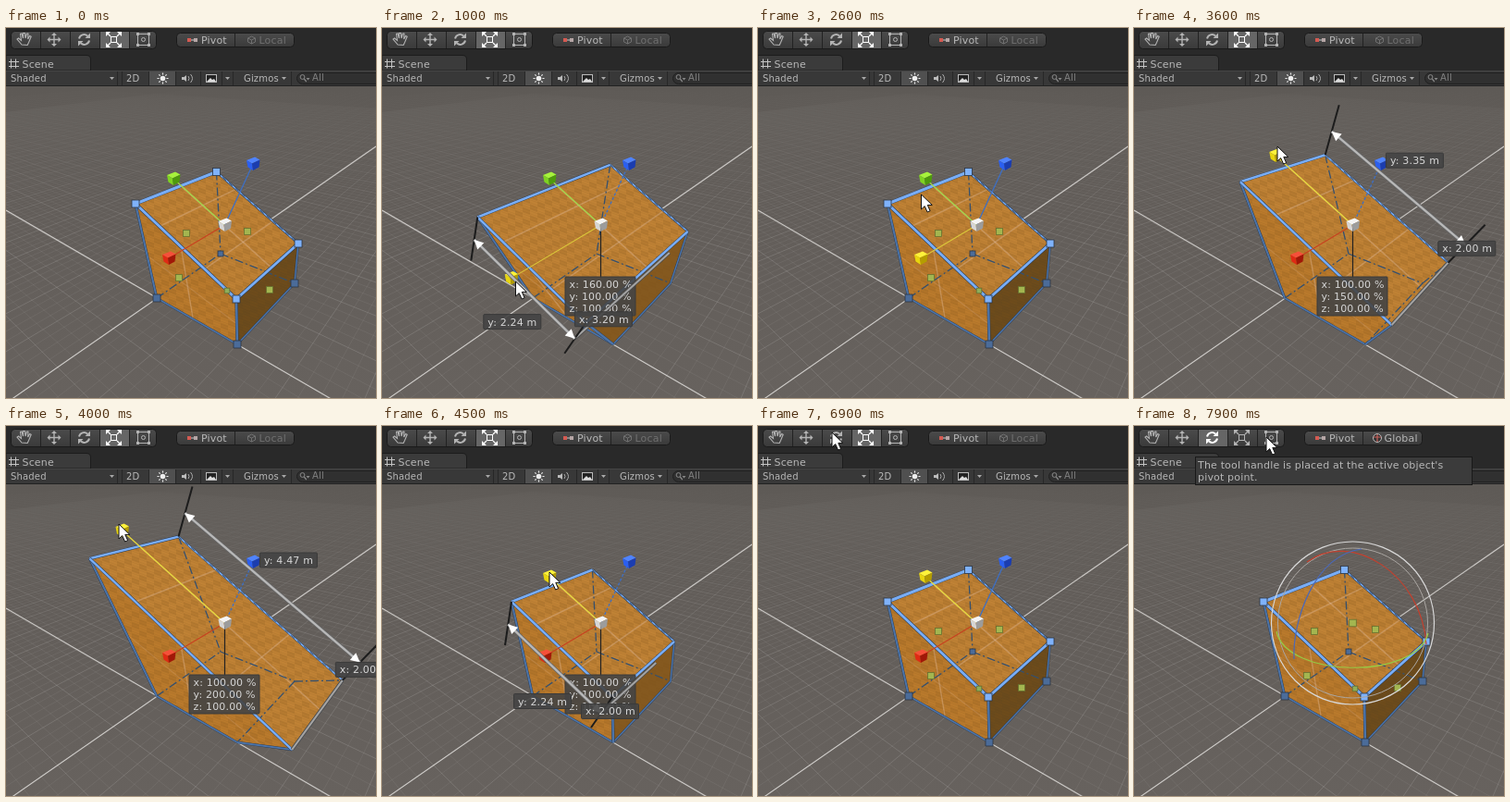
Recreate the animation shown at these times as an HTML page. Size 400 by 400 pixels, loop 8 s.

```html
<!DOCTYPE html>
<html lang="en">
<head>
<meta charset="utf-8">
<title>Scene view</title>
<style>
html, body { margin: 0; width: 100%; height: 100%; overflow: hidden; background: #292929; }
svg { display: block; width: 100vw; height: 100vh; }
text { font: 11px "DejaVu Sans", sans-serif; letter-spacing: .17px; fill: #b8b8b8; white-space: pre; }
.small text { font-size: 10px; }
</style>
</head>
<body>
<svg viewBox="0 0 400 400">
  <defs>
    <linearGradient id="sky" x1="0" y1="0" x2="0" y2="1">
      <stop offset="0" stop-color="#5e5a56"/><stop offset=".35" stop-color="#625d59"/><stop offset="1" stop-color="#67625e"/>
    </linearGradient>
    <linearGradient id="fade" gradientUnits="userSpaceOnUse" x1="0" y1="63" x2="0" y2="240">
      <stop offset="0" stop-color="#000"/><stop offset=".3" stop-color="#555"/><stop offset="1" stop-color="#fff"/>
    </linearGradient>
    <linearGradient id="btn" x1="0" y1="0" x2="0" y2="1">
      <stop offset="0" stop-color="#4b4b4b"/><stop offset="1" stop-color="#3a3a3a"/>
    </linearGradient>
    <mask id="haze"><rect y="63" width="400" height="337" fill="url(#fade)"/></mask>
    <clipPath id="view"><rect y="63" width="400" height="337"/></clipPath>
    <pattern id="weave" width="16" height="12" patternUnits="userSpaceOnUse" patternTransform="skewY(20)">
      <path d="M0 0h8v6h-8zM8 6h8v6h-8z" fill="#7a5018" opacity=".16"/>
      <path d="M0 1.500h16M0 4.500h16M0 7.500h16M0 10.500h16" stroke="#7a5018" stroke-width="1" opacity=".14"/>
    </pattern>
  </defs>
  <g clip-path="url(#view)">
    <rect y="63" width="400" height="337" fill="url(#sky)"/>
    <g id="grid" mask="url(#haze)" fill="none"></g>
    <path d="M0 197L360 406M400 128L0 405.5" stroke="#e4e2df" stroke-width="1.1" opacity=".8"/>
    <g id="model"></g>
    <g id="gizmo"></g>
  </g>
  <g id="bars"></g>
  <g id="tools"></g>
  <g id="tip">
    <rect x="66.5" y="33.5" width="299" height="30" fill="#3b3b3b" stroke="#191919"/>
    <text x="69" y="46">The tool handle is placed at the active object's</text>
    <text x="69" y="59">pivot point.</text>
  </g>
  <path id="cursor" d="M0 0V16L3.7 12.6L6.6 19L9.6 17.7L6.8 11.4H11.8Z" fill="#fff" stroke="#111" stroke-width="1"/>
</svg>
<script>
const LOOP = 8000;
const $ = id => document.getElementById(id);
const mix = (a, b, k) => a + (b - a) * k;
const lerp = (p, q, k) => [mix(p[0], q[0], k), mix(p[1], q[1], k)];
const shift = (p, d, k = 1) => [p[0] + d[0] * k, p[1] + d[1] * k];
const pt = p => p[0].toFixed(1) + ' ' + p[1].toFixed(1);
const trail = ps => 'M' + ps.map(pt).join('L');

const path = (d, stroke, w = 1, extra = '') =>
  `<path d="${d}" fill="none" stroke="${stroke}" stroke-width="${w}" ${extra}/>`;
const fill = (d, color, extra = '') => `<path d="${d}" fill="${color}" ${extra}/>`;
const line = (p, q, color, w, extra) => path(trail([p, q]), color, w, extra);
const rect = (x, y, w, h, color, extra = '') =>
  `<rect x="${x}" y="${y}" width="${w}" height="${h}" fill="${color}" ${extra}/>`;
const text = (x, y, s, extra = '') => `<text x="${x}" y="${y}" ${extra}>${s}</text>`;

// Perspective map sending the square [-1,1] x [-1,1] onto a quad
function plane(a, b, c, d) {
  const e = [c[0] - a[0], c[1] - a[1]], f = [d[0] - b[0], d[1] - b[1]], g = [b[0] - a[0], b[1] - a[1]];
  const det = e[0] * f[1] - e[1] * f[0];
  const s = (g[0] * f[1] - g[1] * f[0]) / det, t = (g[0] * e[1] - g[1] * e[0]) / det;
  const h = (p, w) => [p[0] * w, p[1] * w, w];
  const A = h(a, 2 - 2 * s), B = h(b, 2 - 2 * t), C = h(c, 2 * s);
  const mid = A.map((n, i) => (n + C[i]) / 2);
  const U = A.map((n, i) => (B[i] - n) / 2), V = B.map((n, i) => (C[i] - n) / 2);
  const at = (u, v) => {
    const [x, y, w] = mid.map((n, i) => n + u * U[i] + v * V[i]);
    return [x / w, y / w];
  };
  return { at, mid, U, V };
}

const E = [163, 292], F = [232, 244], G = [312, 276], H = [250, 342];
const top4 = plane([140, 190], [227.5, 155.5], [316, 233], [249, 293]);
const ground = plane(E, F, G, H);
const HUB = [236.5, 213];
const RED = [176, 249], GREEN = [181, 163], BLUE = [267, 147];

function drawGrid() {
  let fine = '', bold = '';
  const { at, mid, U, V } = ground;
  const add = (p, q, i) => { if (i % 4) fine += trail([p, q]); else bold += trail([p, q]); };
  for (let i = -60; i <= 110; i++) {
    const u = i / 4 - 1;
    add(at(u, (0.12 - mid[2] - u * U[2]) / V[2]), at(u, -50), i);
  }
  for (let i = -130; i <= 60; i++) {
    const v = i / 4 - 1;
    add(at((0.12 - mid[2] - v * V[2]) / U[2], v), at(60, v), i);
  }
  $('grid').innerHTML = path(fine, '#fff', .8, 'opacity=".08"') + path(bold, '#fff', 1, 'opacity=".13"');
}

function drawBars() {
  const caret = (x, y) => fill(`M${x} ${y}h5l-2.5 3z`, '#aaa');
  const cut = x => rect(x, 47, 1, 15, '#272727');
  $('bars').innerHTML =
    rect(0, 0, 400, 63, '#292929') +
    fill('M0 46V29.5H87Q91.5 29.5 91.5 34V46Z', '#3b3b3b', 'stroke="#1c1c1c"') +
    path('M5.500 33.500v10M10.500 33.500v10M3 36.500h11M3 41.500h11', '#c4c4c4', 1) +
    text(17.5, 43, 'Scene') +
    rect(0, 46, 400, 17, '#383838') + rect(0, 46, 400, 1, '#454545') + rect(0, 62, 400, 1, '#222') +
    rect(155, 47, 28, 15, '#505050') +
    [120, 125, 154, 183, 210, 233, 245, 308].map(cut).join('') +
    '<g class="small">' + text(5, 58, 'Shaded') + text(130, 58, '2D') + text(257, 58, 'Gizmos') + '</g>' +
    caret(112, 53) + caret(237, 53) + caret(298, 53) +
    '<circle cx="169.500" cy="54.500" r="2.800" fill="#eee"/>' +
    path('M169.500 48.500v2M169.500 58.500v2M163.500 54.500h2M173.500 54.500h2M165.300 50.300l1.400 1.400M172.300 57.300l1.400 1.400M165.300 58.700l1.400-1.400M172.300 51.700l1.400-1.400', '#eee', 1.2) +
    fill('M190 53h2.500l2.500-2v7l-2.500-2H190z', '#bbb') +
    path('M197 52q2 2.500 0 5M199.500 50q4 4.500 0 9', '#aaa', 1) +
    rect(216.5, 50.5, 11, 8, '#222', 'stroke="#bbb"') + fill('M217 58l4-4 2 2 2-1 2 3z', '#ddd') +
    rect(314.5, 48.5, 95, 12, '#303030', 'rx="6" stroke="#202020"') +
    '<circle cx="320.500" cy="53" r="2.400" fill="none" stroke="#888"/>' + path('M322.300 55l2.500 3', '#888', 1.2) + fill('M324.500 54h4l-2 2.500z', '#888') +
    '<g class="small">' + text(331, 57, 'All', 'style="fill:#808080"') + '</g>';
}

function drawTools(rotating) {
  const on = rotating ? 2 : 3, x = 5 + on * 32;
  const ink = '#b4b4b4', local = rotating ? '#c0c0c0' : '#707070';
  let s = rect(5.5, 3.5, 157, 19, 'url(#btn)', 'rx="4" stroke="#1a1a1a"') + rect(x, 4, 32, 18, '#666');
  for (let i = 1; i < 5; i++) s += rect(5 + i * 32, 4, 1, 18, '#222');
  s += path('M17 18l-5-6 1.500-1 3 2.500-1-7 1.500-.5 1.500 5V5.500h2l.5 5.500 1.500-5h1.500l-.3 6 2-3.500 1.500 .8-2.500 6-1.500 3.200z', ink, 1.1);
  s += path('M52 7v11M46.500 12.500h11', ink, 1.4) +
    fill('M49 8l3-3 3 3zM49 17l3 3 3-3zM47.500 9.500l-3 3 3 3zM56.500 9.500l3 3-3 3z', ink);
  const r = on === 2 ? '#fff' : ink;
  s += path('M79 11.500a5.500 5.500 0 0 1 9-3M90 13.500a5.500 5.500 0 0 1-9 3', r, 2) +
    fill('M91 5.500v5.500h-5.500zM78 19.500v-5.500h5.500z', r);
  const c = on === 3 ? '#fff' : ink;
  s += rect(113.5, 9.5, 6, 6, 'none', `stroke="${c}"`) + path('M109 5l4 4M124 5l-4 4M109 20l4-4M124 20l-4-4', c, 1.2) +
    fill('M108 4h5l-5 5zM125 4v5l-5-5zM108 21v-5l5 5zM125 21h-5l5-5z', c);
  s += rect(142.5, 6.5, 12, 12, 'none', `stroke="${ink}"`) + `<circle cx="148.500" cy="12.500" r="2" fill="none" stroke="${ink}"/>`;
  for (const px of [141, 153]) for (const py of [5, 17]) s += rect(px, py, 3, 3, ink);
  s += rect(184.5, 5.5, 127, 15, 'url(#btn)', 'rx="4" stroke="#1a1a1a"') + rect(247, 6, 1, 14, '#222');
  s += rect(196, 11, 4, 4, '#d45a52') + rect(200, 12.5, 3, 1, '#ccc') + rect(203, 11, 4, 4, '#b5a5a5') + text(211, 17, 'Pivot');
  if (rotating) {
    s += '<circle cx="263" cy="13" r="4.500" fill="#333" stroke="#bbb"/>' + path('M259 12h8M263 9v8', '#c8605a', 1.2);
    s += text(270.5, 17, 'Global');
  } else {
    s += path('M265.500 9l4 2v4l-4 2-4-2v-4zM261.500 11l4 2 4-2M265.500 13v4', local, 1);
    s += text(273.5, 17, 'Local', `style="fill:${local}"`);
  }
  $('tools').innerHTML = s;
}

const DOT_REST = [[195, 222], [261, 220], [187, 270], [285, 283]];
const DOT_TALL = [[184, 211], [259, 208], [183, 256], [300, 297]];
const square = (p, r, color, edge = '#2c3440') =>
  rect((p[0] - r).toFixed(1), (p[1] - r).toFixed(1), 2 * r, 2 * r, color, `stroke="${edge}" stroke-width=".8"`);

function drawModel(u, v, dragging, rotating) {
  const at = top4.at;
  const A = at(-u, -v), B = at(u, -v), C = at(u, v), D = at(-u, v);
  const cross = (D[0] - C[0]) * (H[1] - D[1]) - (D[1] - C[1]) * (H[0] - D[0]);
  const open = cross < 0;
  const narrow = u < .9;
  const face = (ps, color) => fill(trail(ps) + 'Z', color);
  const cloth = ps => face(ps, 'url(#weave)');
  const orange = '#bd7f33';
  let s = face([A, B, F, E], orange) + face([B, C, G, F], orange) + face([E, F, G, H], orange) + face([C, D, H, G], orange);
  s += face([A, E, H, D], narrow ? '#cc8d42' : '#ba7a2c') + cloth([A, E, H, D]);
  if (open) s += face([C, D, H, G], narrow ? '#a87230' : dragging ? '#85591f' : '#68491c') + cloth([C, D, H, G]);
  s += face([A, B, C, D], '#c08235') + cloth([A, B, C, D]);

  const pale = 'opacity=".32"';
  s += line(at(0, -v), at(0, v), '#e6c4ae', 1.5, pale);
  for (const k of [-.5, .4]) s += line(at(-u, v * k), at(u, v * k), '#e6c4ae', 1.5, pale);
  s += line(lerp(A, D, .45), lerp(E, H, .45), '#e6c4ae', 1.5, pale) + line(lerp(A, E, .55), lerp(D, H, .55), '#e6c4ae', 1.2, 'opacity=".18"');

  const hidden = (p, q) => line(p, q, '#35506e', 1.3, 'stroke-dasharray="9 3 2 3"');
  s += hidden(B, F) + hidden(E, F) + hidden(F, G);
  const dim = '#4d74a8';
  const rim = (p, q, w = 2, color = dim) => line(p, q, '#27384f', w + .8) + line(p, q, color, w);
  s += rim(A, E) + rim(E, H, 1.6);
  if (open) s += rim(H, G, 1.5) + rim(G, C, 1.5) + rim(D, H, 2.4);
  else s += hidden(G, H) + hidden(G, C) + rim(D, H, 1.8);
  const lit = '#79adf5', bold = dragging ? 2.5 : 3;
  s += rim(B, C, 1.6, lit) + line(B, C, '#2b3d55', .8, 'stroke-dasharray="5 4"');
  s += rim(A, B, bold, lit) + rim(C, D, bold, lit) + rim(A, D, bold, lit);

  if (!dragging) {
    const tall = (v - 1) / .6, green = '#a3b650', edge = '#66702f';
    DOT_REST.forEach((p, i) => s += square(lerp(p, DOT_TALL[i], tall), 3.5, green, edge));
    s += square([239, 284], 2.8, '#8fae5a', edge);
    for (const p of [E, F, G, H]) s += square(p, p === F ? 3 : 4, '#4b6c99');
    for (const p of [A, B, C, D]) s += square(p, 4, '#7fb2fb');
    if (rotating) s += square(HUB, 3.8, green, edge);
  }
  $('model').innerHTML = s;
  return [A, B, C, D];
}

function cube(p, light, mid, dark) {
  const [x, y] = p, q = (...o) => trail(o.map(d => [x + d[0], y + d[1]])) + 'Z';
  return fill(q([-7, -4], [2, -7.5], [7.5, -4.5], [-1, -.5]), light) +
    fill(q([-7, -4], [-1, -.5], [0, 7], [-5.5, 3.5]), mid) +
    fill(q([-1, -.5], [7.5, -4.5], [6.5, 3.5], [0, 7]), dark);
}

function note(x, y, rows) {
  const w = rows.length > 1 ? 76 : 62, h = rows.length > 1 ? 42 : 16;
  return rect(x.toFixed(1), y.toFixed(1), w, h, '#444', 'fill-opacity=".9" stroke="#3a3a3a" rx="1"') +
    rows.map((r, i) => text((x + 4.5).toFixed(1), (y + 12 + i * 13).toFixed(1), r, 'style="fill:#d6d6d6"')).join('');
}

function arrow(p, q) {
  const len = Math.hypot(q[0] - p[0], q[1] - p[1]) || 1;
  const d = [(q[0] - p[0]) / len, (q[1] - p[1]) / len], n = [-d[1], d[0]];
  const head = (o, k) => {
    const base = shift(o, d, 10 * k);
    return fill(trail([o, shift(base, n, 5), shift(base, n, -5)]) + 'Z', '#fff');
  };
  return line(p, q, '#666', 4) + line(p, q, '#b8b8b8', 2.4) + head(p, 1) + head(q, -1);
}

function drawDims([A, B, C, D], u, v) {
  const far = v >= 1.3;
  const oa = far ? [15, -54] : [-7, 47], ob = far ? [40, -41] : [-23, 33];
  const oc = far ? ob : [-38, 44], od = far ? [46, -42] : ob;
  const [p, q] = far ? [B, C] : [A, D];
  const k = far ? .47 : .52;
  const tick = (a, o) => line(a, shift(a, o), '#1c1c1c', 2);
  const tag = (a, b, o1, o2, m, s) => {
    const c = shift(lerp(a, b, .5), lerp(o1, o2, .5), m);
    return note(c[0] - 31, c[1] - 8, [s]);
  };
  // The width bar is seen nearly edge-on, so it has no visible heads
  const [w0, w1] = far ? [D, C] : [shift(D, od, k), shift(C, oc, k)];
  return line(w0, w1, '#4c4c4c', 3.6) + line(w0, w1, '#a4a4a4', 2) + tick(p, oa) + tick(q, ob) +
    arrow(shift(p, oa, k), shift(q, ob, k)) +
    tag(p, q, oa, ob, far ? 1.1 : 1.4, `y: ${(Math.sqrt(5) * v).toFixed(2)} m`) +
    tag(D, C, od, oc, 1.18, `x: ${(2 * u).toFixed(2)} m`);
}

function drawGizmo(corners, u, v, axis, dragging, rotating) {
  if (rotating) {
    $('gizmo').innerHTML =
      '<circle cx="236.500" cy="213" r="88" fill="none" stroke="#d8d8d8" stroke-width="1.200"/>' +
      '<circle cx="236.500" cy="213" r="81" fill="none" stroke="#aaa6a2" stroke-width="1"/>' +
      path('M187 147C235 112 311 160 316 236', '#c2402e', 1.2) +
      path('M154 222C165 273 305 275 318 224', '#98c944', 1.2) +
      path('M173 252C171 212 194 140 246 133', '#4a68b8', 1.2);
    return;
  }
  const red = dragging && axis === 'x' ? lerp(HUB, RED, u) : RED;
  const green = dragging && axis === 'y' ? lerp(HUB, GREEN, v) : GREEN;
  const gold = ['#fff23a', '#e8d50e', '#b59d00'];
  const rc = axis === 'x' ? gold : ['#f5503a', '#e02a14', '#a11808'];
  const gc = axis === 'y' ? gold : ['#a6f23c', '#7ed321', '#4e9a0c'];
  let s = line(HUB, BLUE, '#3d6fc4', 1.3, dragging ? 'stroke-dasharray="3 2"' : '') +
    line(HUB, red, axis === 'x' ? '#dbc83a' : '#c8401f', 1.1) +
    line(HUB, green, axis === 'y' ? '#e8da3c' : '#a2d84a', 1.3);
  if (dragging) s += line(HUB, [HUB[0], 270], '#222', 1.2);
  s += cube(BLUE, '#4f83ff', '#2b5ff0', '#1b3db0') + cube(red, ...rc) + cube(green, ...gc) +
    cube(HUB, '#f4f4f4', '#d6d6d6', '#9c9c9c');
  if (dragging) {
    const pc = n => (n * 100).toFixed(2) + ' %';
    s += note(198, 269, ['x: ' + pc(u), 'y: ' + pc(v), 'z: 100.00 %']) + drawDims(corners, u, v);
  }
  $('gizmo').innerHTML = s;
}

// Keys: [time, value, ...]
const WIDE = [[900, 1], [1100, 2.1], [1300, 1.2], [1400, 1.2], [1500, .6], [1700, .6], [2200, 1]];
const TALL = [[3400, 1], [3500, 1.2], [3600, 1.5], [4000, 2], [4200, 1.9], [4300, 1.6], [4500, 1], [4600, 1], [4900, 1.6], [5700, 1.6], [5800, 1]];
const MOUSE = [[0, 412, 112], [100, 392, 104], [300, 290, 180], [600, 177, 252], [900, 177, 254], [1100, 112, 294],
  [1300, 166, 268], [1400, 166, 268], [1500, 202, 247], [1700, 202, 247], [2200, 178, 254], [2400, 172, 200],
  [2800, 181, 160], [3400, 181, 160], [3600, 155, 128], [4000, 122, 106], [4200, 128, 110], [4500, 181, 158],
  [4600, 181, 158], [4900, 149, 130], [5400, 149, 130], [5500, 148, 144], [6000, 148, 144], [6500, 120, 60],
  [6900, 80, 7], [7000, 82, 10], [7300, 214, 13], [7600, 214, 13], [7800, 162, 11], [7900, 143, 12]];

function track(keys, t) {
  if (t <= keys[0][0]) return keys[0].slice(1);
  for (let i = 1; i < keys.length; i++) {
    const a = keys[i - 1], b = keys[i];
    if (t <= b[0]) return a.slice(1).map((n, j) => mix(n, b[j + 1], (t - a[0]) / (b[0] - a[0])));
  }
  return keys[keys.length - 1].slice(1);
}
const snap = n => Math.round(n * 10) / 10;

function draw(t) {
  const u = snap(track(WIDE, t)[0]), v = snap(track(TALL, t)[0]);
  const dragging = (t >= 900 && t < 2300) || (t >= 3400 && t < 5000);
  const rotating = t >= 7000;
  const axis = t < 900 ? '' : t < 3400 ? 'x' : 'y';
  const corners = drawModel(u, v, dragging, rotating);
  drawGizmo(corners, u, v, axis, dragging, rotating);
  drawTools(rotating);
  $('tip').style.display = t >= 7600 ? '' : 'none';
  const [x, y] = track(MOUSE, t);
  $('cursor').setAttribute('transform', `translate(${x.toFixed(1)} ${y.toFixed(1)})`);
}

drawGrid();
drawBars();
const start = performance.now();
let last = -1;
function tick() {
  const t = Math.floor(((performance.now() - start) % LOOP) / 100) * 100;
  if (t !== last) draw(last = t);
  requestAnimationFrame(tick);
}
tick();
</script>
</body>
</html>
```
